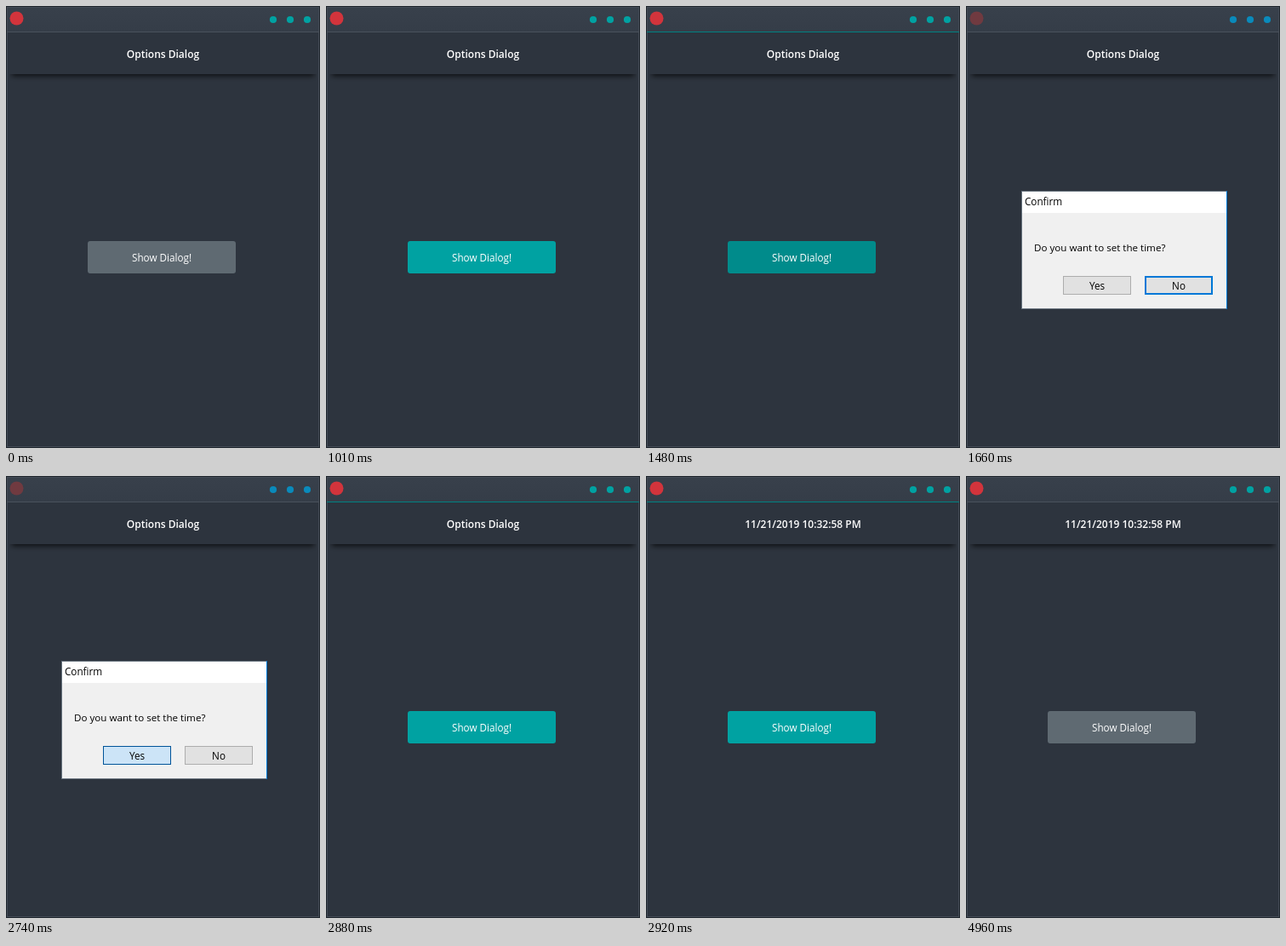
Recreate the animation shown at these times as an HTML page with a canvas. Size 369 by 519 pixels, loop 5.11 s.

```html
<!DOCTYPE html>
<html lang="en">
<head>
<meta charset="utf-8">
<title>Options Dialog</title>
<style>
html, body { margin: 0; width: 100%; height: 100%; overflow: hidden; background: #2d343e; }
canvas { display: block; }
</style>
</head>
<body>
<canvas id="stage" width="369" height="519"></canvas>
<script>
const ctx = document.getElementById('stage').getContext('2d');
const LOOP = 5110;
const FONT = '"Open Sans", "Noto Sans", sans-serif';
const TEAL = '#00a2a2', BLUE = '#0a8abb', ACCENT = '#0078d7';

// Each step adds to the state left by the one before it.
const STEPS = [
  [0, { title: 'Options Dialog', button: '#5f6a72', line: '#4a525c', dialog: false, yes: 'normal', no: 'focus' }],
  [1010, { button: TEAL }],
  [1480, { button: '#008b8b', line: '#008282' }],
  [1660, { dialog: true, line: '#4a525c' }],
  [2400, { yes: 'hover' }],
  [2740, { yes: 'down', no: 'normal' }],
  [2880, { dialog: false, button: TEAL, line: '#008282' }],
  [2920, { title: '11/21/2019 10:32:58 PM' }],
  [4960, { button: '#5f6a72', line: '#4a525c' }]
];

// fill, border, border width
const LOOKS = {
  normal: ['#e1e1e1', '#adadad', 1],
  focus: ['#e1e1e1', ACCENT, 2],
  hover: ['#e5f1fb', ACCENT, 1],
  down: ['#cce4f7', '#005499', 1]
};

function stateAt(ms) {
  return Object.assign({}, ...STEPS.filter(s => s[0] <= ms).map(s => s[1]));
}

function rect(x, y, w, h, color) {
  ctx.fillStyle = color;
  ctx.fillRect(x, y, w, h);
}

function disc(x, y, r, color) {
  ctx.fillStyle = color;
  ctx.beginPath();
  ctx.arc(x, y, r, 0, Math.PI * 2);
  ctx.fill();
}

function text(str, x, y, size, color, align = 'center', weight = 400) {
  ctx.font = `${weight} ${size}px ${FONT}`;
  ctx.textAlign = align;
  ctx.fillStyle = color;
  ctx.fillText(str, x, y);
}

function drawHeader(s) {
  const bar = ctx.createLinearGradient(0, 2, 0, 30);
  bar.addColorStop(0, '#38404b');
  bar.addColorStop(1, '#353d48');
  rect(2, 2, 365, 28, bar);
  rect(1, 30, 367, 1, s.line);
  disc(12.5, 14.5, 8, s.dialog ? '#703a40' : '#d2343c');
  for (const x of [314, 334, 354]) disc(x, 16, 4.1, s.dialog ? BLUE : TEAL);

  ctx.save();
  ctx.beginPath();
  ctx.rect(4, 80, 361, 12);
  ctx.clip();
  ctx.shadowColor = 'rgba(0,0,0,0.75)';
  ctx.shadowBlur = 6;
  ctx.shadowOffsetY = 2;
  rect(7, 60, 355, 20, '#2d343e');
  ctx.restore();
  text(s.title, 184.5, 61, 12, '#fff', 'center', 600);
}

function drawButton(color) {
  ctx.fillStyle = color;
  ctx.beginPath();
  ctx.roundRect(96, 276, 174, 38, 3);
  ctx.fill();
  text('Show Dialog!', 183, 300, 11.7, '#fff');
}

function drawChoice(label, x, look) {
  const [fill, border, w] = LOOKS[look];
  rect(x, 317, 80, 22, border);
  rect(x + w, 317 + w, 80 - 2 * w, 22 - 2 * w, fill);
  text(label, x + 40, 333, 11.7, '#000');
}

function drawDialog(s) {
  rect(65, 217, 242, 139, '#69747f');
  rect(306, 217, 1, 139, ACCENT);
  rect(66, 218, 240, 25, '#fff');
  rect(66, 243, 240, 112, '#f0f0f0');
  text('Confirm', 69, 234, 11.7, '#000', 'left');
  text('Do you want to set the time?', 80, 288, 11.6, '#000', 'left');
  drawChoice('Yes', 114, s.yes);
  drawChoice('No', 210, s.no);
}

function draw(ms) {
  const s = stateAt(ms);
  rect(0, 0, 369, 519, '#20262e');
  rect(1, 1, 367, 517, '#434b56');
  rect(2, 2, 365, 515, '#2d343e');
  drawHeader(s);
  if (s.dialog) drawDialog(s);
  else drawButton(s.button);
}

const start = performance.now();
function tick() {
  draw((performance.now() - start) % LOOP);
  requestAnimationFrame(tick);
}
tick();
</script>
</body>
</html>
```
